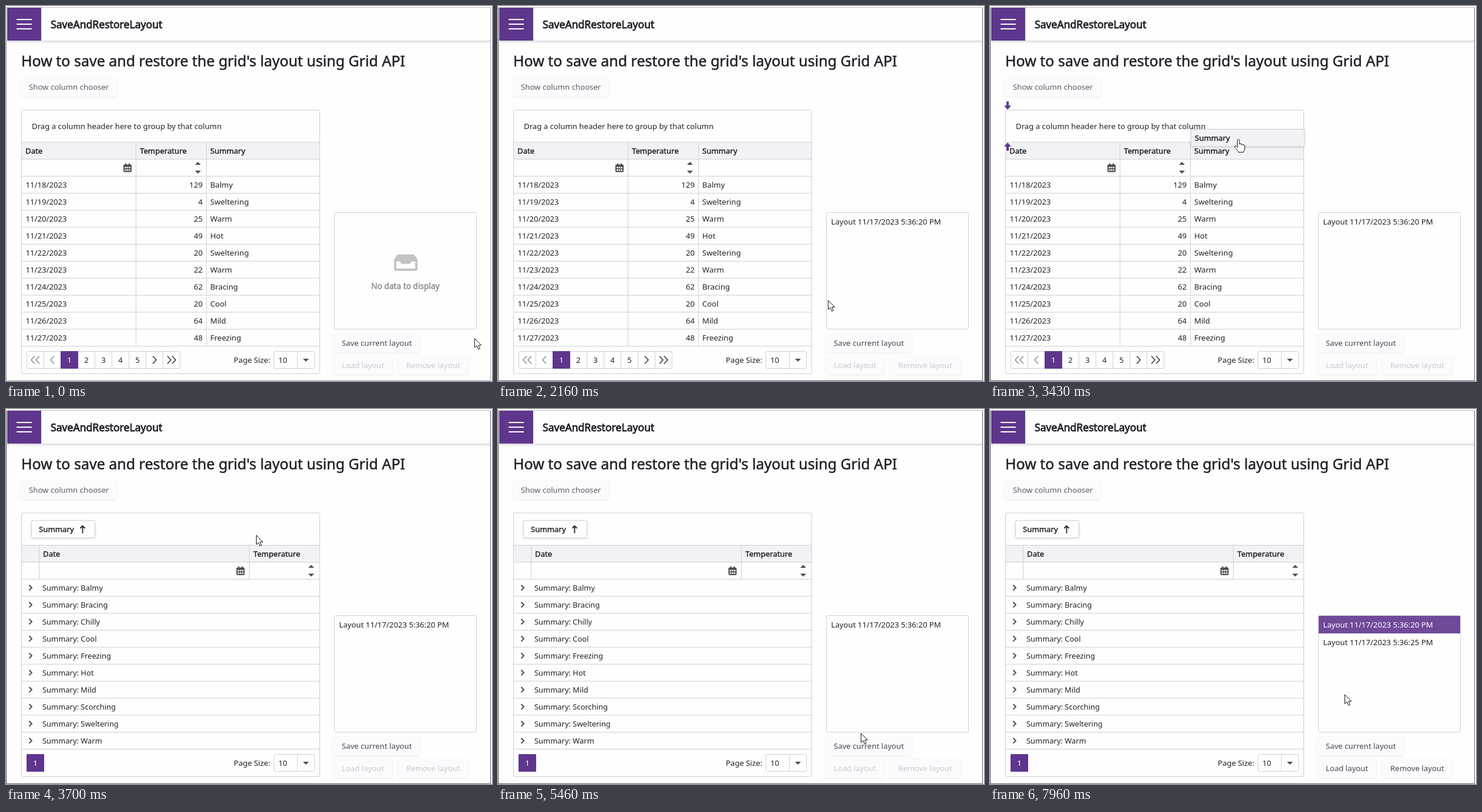
An HTML page for the animation above (8 s loop, 828 by 640 pixels).

```html
<!DOCTYPE html>
<html lang="en">
<head>
<meta charset="utf-8">
<title>Grid layout</title>
<style>
  html, body { margin: 0; width: 100%; height: 100%; overflow: hidden; background: #fefefe; }
  svg { display: block; width: 828px; height: 640px; }
  text { font: 13.2px "Noto Sans", "Open Sans", sans-serif; fill: #212129; white-space: pre; }
  .semi { stroke: #212129; stroke-width: .4px; }
  .box { fill: #fefefe; stroke: #d0d0d3; }
  .line { fill: none; stroke: #d0d0d3; }
  .icon { fill: #4c4c51; }
  .chevron { fill: none; stroke: #46464b; stroke-width: 1.8; }
  .off { stroke: #98989c; }
  .button rect { fill: #fbfbfd; filter: drop-shadow(0 1px 2px #00000012); }
  .button text { fill: #46464e; }
  .button.hover rect { fill: #f2f2f5; }
  .button.disabled text { fill: #c9c9ce; }
  .raised { fill: #fefefe; stroke: #d4d4d8; filter: drop-shadow(0 1px 2px #0002); }
  #grouped .group { font-size: 12.95px; }
</style>
</head>
<body>
<svg viewBox="0 0 828 640">
  <defs>
    <linearGradient id="fade" x2="0" y2="1">
      <stop stop-color="#d9d9db"/><stop offset="1" stop-color="#fefefe"/>
    </linearGradient>
    <g id="calendar">
      <path class="icon" d="M2 2h1V0h2v2h4V0h2v2h1a2 2 0 0 1 2 2v9a2 2 0 0 1-2 2H2a2 2 0 0 1-2-2V4a2 2 0 0 1 2-2z"/>
      <path fill="none" stroke="#fefefe" stroke-width="2.6" stroke-dasharray="2.6 1.1" d="M2 7.300h10M2 11.500h10"/>
    </g>
    <path id="spinner" class="icon" d="M0 5l5-5 5 5zM0 15h10l-5 5z"/>
  </defs>

  <rect x="2" y="59" width="823" height="5" fill="url(#fade)"/>
  <rect x="2" y="3" width="58" height="56" fill="#5f368d"/>
  <path d="M18 23h26M18 31h26M18 39h26" stroke="#fff" stroke-width="2"/>
  <text x="76" y="38" class="semi" style="font-size:17.6px;stroke-width:.8px">SaveAndRestoreLayout</text>
  <text x="26" y="103" class="semi" style="font-size:25px;stroke-width:.5px">How to save and restore the grid's layout using Grid API</text>
  <path d="M0 2.5H826" stroke="#bcbcbe"/>
  <path id="frame" d="M.5 3V639.5H825.5V3" fill="none"/>

  <g class="button"><rect x="26" y="123" width="163" height="31" rx="3"/><text x="39" y="143" style="fill:#5c5c64">Show column chooser</text></g>

  <rect class="box" x="26.5" y="177.5" width="508" height="450" rx="2"/>
  <rect x="27" y="233" width="507" height="28" fill="#f2f1f5"/>
  <path id="rules" class="line"/>

  <g id="flat"></g>
  <g id="grouped"></g>

  <text x="388" y="609">Page Size:</text>
  <rect class="box" x="456.5" y="589.5" width="69" height="29" rx="2"/>
  <path class="line" d="M496.5 590v28"/>
  <text x="464" y="609">10</text>
  <path class="icon" d="M506 602h10l-5 5z"/>

  <rect class="box" x="559.5" y="352.5" width="242" height="199" rx="2"/>
  <g id="empty">
    <path fill="#c4c4c6" d="M669 424h24q2 0 3 1l4 6q1 1 1 3v15q0 3-3 3h-34q-3 0-3-3v-15q0-2 1-3l4-6q1-1 3-1z"/>
    <path fill="#fefefe" d="M665 436h7v1q0 3 3 3h12q3 0 3-3v-1h7v12h-32z"/>
    <path fill="#fefefe" d="M671 428h20l4 5h-5v3h-18v-3h-5z" opacity="0"/>
    <text x="680.5" y="483" text-anchor="middle" style="font-size:13.7px;fill:#86868a;stroke:#86868a;stroke-width:.4px">No data to display</text>
  </g>
  <rect id="rowFill" x="560" width="241" height="30"/>
  <text id="first" x="567.5" y="373">Layout 11/17/2023 5:36:20 PM</text>
  <text id="second" x="567.5" y="403">Layout 11/17/2023 5:36:25 PM</text>

  <g id="save" class="button"><rect x="558" y="560" width="147" height="31" rx="3"/><text x="572" y="580">Save current layout</text></g>
  <g id="load" class="button"><rect x="558" y="598" width="101" height="31" rx="3"/><text x="572" y="618">Load layout</text></g>
  <g id="remove" class="button"><rect x="668" y="598" width="120" height="31" rx="3"/><text x="682" y="618">Remove layout</text></g>

  <g id="drag">
    <path id="dropMark" fill="#5f368d" d="M28 163h4v7h4l-6 7-6-7h4zM28 247h4v-7h4l-6-7-6 7h4z"/>
    <g id="ghost">
      <rect class="raised" x="341.5" y="232.5" width="193" height="29" style="fill:#f2f1f5"/>
      <text class="semi" x="348" y="252">Summary</text>
    </g>
  </g>

  <g id="cursor" fill="#fff" stroke="#111" stroke-linejoin="round">
    <path id="arrow" d="M.5.5V16l3.6-3.2 2.6 6 2.7-1.2-2.6-5.7h4.9z"/>
    <path id="hand" d="M-3.5 2c0-2 3.5-2 3.5 0v7c0-2 3-2 3 0v1c0-2 3-1.5 3 .5v.5c0-1.7 3-1.5 3 .7V16c0 3-1.5 4-2 6.5H-2c0-2-5-7-6-9.5-.6-1.700 1.500-2.400 2.800-.8l1.700 2z"/>
  </g>
</svg>
<script>
const el = id => document.getElementById(id);
const text = (x, y, s, attrs = '') => `<text x="${x}" y="${y}" ${attrs}>${s}</text>`;
const use = (id, x, y) => `<use href="#${id}" x="${x}" y="${y}"/>`;
const line = d => `<path class="line" d="${d}"/>`;
const chevron = (x, y, dx, dy, off = '') =>
  `<path class="chevron ${off}" d="M${x} ${y - dy}l${dx} ${dy}l${-dx} ${dy}"/>`;
const pageOne = x =>
  `<rect x="${x}" y="589" width="30" height="30" rx="1" fill="#5f368d"/>` +
  text(x + 15, 609, 1, 'text-anchor="middle" style="fill:#fff"');
const rowY = i => 310 + 29 * i;

el('rules').setAttribute('d', Array.from({ length: 13 }, (_, i) => `M27 ${232.5 + 29 * i}h507`).join(''));

const weather = [[129, 'Balmy'], [4, 'Sweltering'], [25, 'Warm'], [49, 'Hot'], [20, 'Sweltering'],
  [22, 'Warm'], [62, 'Bracing'], [20, 'Cool'], [64, 'Mild'], [48, 'Freezing']];

el('flat').innerHTML =
  text(44, 210, 'Drag a column header here to group by that column') +
  line('M221.5 233V580M341.5 233V580') +
  text(33, 252, 'Date', 'class="semi"') + text(228, 252, 'Temperature', 'class="semi"') +
  text(348, 252, 'Summary', 'class="semi"') +
  use('calendar', 200, 268.5) + use('spinner', 322, 266) +
  weather.map(([degrees, summary], i) =>
    text(33.5, rowY(i), `11/${18 + i}/2023`) +
    text(335, rowY(i), degrees, 'text-anchor="end"') +
    text(348, rowY(i), summary)).join('') +
  '<rect class="box" x="35.5" y="589.5" width="261" height="29" rx="2"/>' +
  line([64.5, 122.5, 151.5, 180.5, 209.5, 238.5, 267.5].map(x => `M${x} 590v28`).join('')) +
  pageOne(93) +
  [2, 3, 4, 5].map(n => text(79 + 29 * n, 609, n, 'text-anchor="middle"')).join('') +
  chevron(49, 604, -6, 6.5, 'off') + chevron(57, 604, -6, 6.5, 'off') + chevron(82, 604, -6, 6.5, 'off') +
  chevron(250, 604, 6, 6.5) + chevron(275, 604, 6, 6.5) + chevron(283, 604, 6, 6.5);

const groups = ['Balmy', 'Bracing', 'Chilly', 'Cool', 'Freezing', 'Hot', 'Mild', 'Scorching', 'Sweltering', 'Warm'];

el('grouped').innerHTML =
  '<rect class="raised" x="43.5" y="190.5" width="108" height="29" rx="2"/>' +
  text(56, 210, 'Summary', 'class="semi"') +
  '<path fill="none" stroke="#212129" stroke-width="1.8" d="M130.5 212V199.5M126.5 203.5l4-4 4 4"/>' +
  line('M56.5 233V290M414.5 233V290') +
  text(63, 252, 'Date', 'class="semi"') + text(421.5, 252, 'Temperature', 'class="semi"') +
  use('calendar', 392.5, 268.5) + use('spinner', 515, 266) +
  groups.map((name, i) =>
    chevron(39.5, rowY(i) - 5, 4.5, 4.5) +
    text(62, rowY(i), 'Summary: ' + name, 'class="group"')).join('') +
  pageOne(35);

// Cursor legs: start, end, x, y, exponent of the vertical progress
const start = [798, 567];
const legs = [
  [470, 960, 700, 573], [1760, 2560, 424, 309, 1.9], [2570, 2930, 424, 249], [3200, 3560, 426, 215],
  [4570, 5400, 618, 545], [5400, 5600, 619, 571], [6480, 7230, 628, 360, .94], [7770, 7960, 604, 487]
];

function cursorAt(t) {
  let [x, y] = start;
  for (const [from, to, endX, endY, bend = 1] of legs) {
    if (t < from) break;
    const u = Math.min(1, (t - from) / (to - from));
    x += (endX - x) * u;
    y += (endY - y) * u ** bend;
  }
  return [Math.round(x), Math.round(y)];
}

const show = (id, on) => { el(id).style.display = on ? '' : 'none'; };

function draw(t) {
  const [x, y] = cursorAt(t);
  const dragging = t >= 3230 && t < 3700;
  const grouped = t >= 3700;
  const selected = t >= 7630;
  const hand = t > 2600 && t < 3700 && y < 262;

  el('frame').setAttribute('stroke', t < 1300 ? '#a6a6a8' : '#626064');
  show('flat', !grouped);
  show('grouped', grouped);
  show('empty', t < 1460);
  show('first', t >= 1460);
  show('second', t >= 5860);

  const hoverSecond = t >= 6500 && y >= 383 && y < 413 && !selected;
  show('rowFill', selected || hoverSecond);
  el('rowFill').setAttribute('y', selected ? 353 : 383);
  el('rowFill').setAttribute('fill', !selected ? '#f2f1f5' : t < 7800 ? '#5f368d' : '#714999');
  el('first').style.fill = selected ? '#fff' : '';

  el('save').classList.toggle('hover', x >= 558 && x < 705 && y >= 560 && y < 591);
  el('load').classList.toggle('disabled', !selected);
  el('remove').classList.toggle('disabled', !selected);

  show('drag', dragging);
  show('dropMark', y < 232);
  el('ghost').setAttribute('transform', `translate(${x - 424} ${y - 249})`);

  show('hand', hand);
  show('arrow', !hand);
  el('cursor').setAttribute('transform', `translate(${x} ${y})`);
}

function tick() {
  draw(performance.now() % 8000);
  requestAnimationFrame(tick);
}
tick();
</script>
</body>
</html>
```
